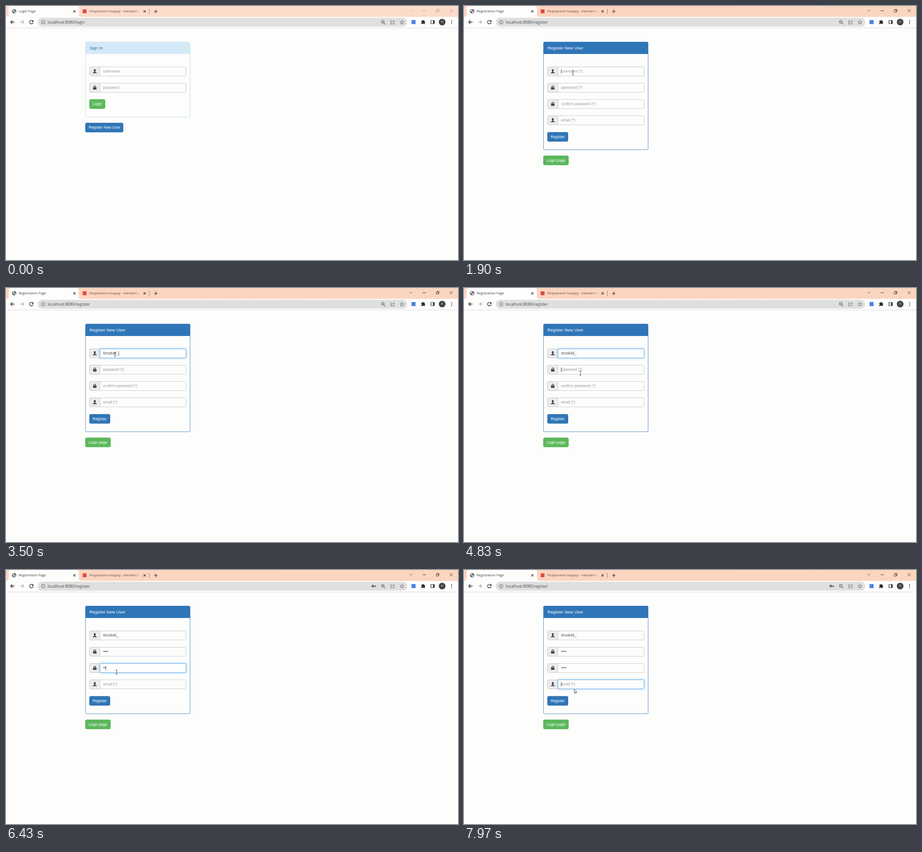
These frames come from a looping animation (998x561 px, 8000 ms). An HTML page with a canvas:

```html
<!DOCTYPE html>
<html lang="en">
<head>
<meta charset="utf-8">
<title>Registration form</title>
<style>
html, body { margin: 0; width: 100%; height: 100%; overflow: hidden; background: #fdfdfc; }
canvas { display: block; width: 998px; height: 561px; }
</style>
</head>
<body>
<canvas id="stage"></canvas>
<script>
const W = 998, H = 561, LOOP = 8000;
const canvas = document.getElementById('stage');
const dpr = window.devicePixelRatio || 1;
canvas.width = W * dpr;
canvas.height = H * dpr;
const c = canvas.getContext('2d');

const UI = '"Open Sans", "Noto Sans", sans-serif';
const ARIAL = '"Liberation Sans", Arial, sans-serif';
const PAPER = '#fdfdfc', INK = '#2b2b2b', GREY = '#5f6368';
const BLUE = '#2f76b8', GREEN = '#5cb85c';
const ROWS = [134, 170, 206, 242];

// Clicks and key presses, in ms
const REGISTER_CLICK = 800, LOADING = 880, LOADED = 1400;
const USER = 'timo846_';
const FIELDS = [
  { hint: 'username (*)', icon: user, click: 1870, value: USER,
    keys: [2300, 2440, 2570, 2710, 2880, 3000, 3120, 3320] },
  { hint: 'password (*)', icon: lock, click: 4810, value: '••••', keys: [5050, 5170, 5290, 5410] },
  { hint: 'confirm password (*)', icon: lock, click: 5900, value: '••••', keys: [6170, 6330, 6480, 6600] },
  { hint: 'email (*)', icon: user, click: 7700, value: '', keys: [] }
];

// Pointer path: time, x, y
const PATH = [
  [60, 262, 308], [560, 230, 270], [850, 230, 269], [1190, 239.5, 227],
  [1300, 240, 222], [1750, 240.5, 147], [3800, 240.5, 147], [4700, 257, 188],
  [5500, 257, 188], [5850, 244, 225.5], [6900, 244, 225.5], [7500, 246, 254],
  [7750, 245, 256], [7900, 243.5, 263.4], [8000, 243.5, 263.4]
];

const clamp = v => Math.max(0, Math.min(1, v));
const ease = v => v * v * (3 - 2 * v);

function text(s, x, y, size, color, family = ARIAL) {
  c.font = size + 'px ' + family;
  c.fillStyle = color;
  c.fillText(s, x, y);
}

function box(x, y, w, h, r, fill, stroke) {
  c.beginPath();
  c.roundRect(x, y, w, h, r);
  if (fill) { c.fillStyle = fill; c.fill(); }
  if (stroke) { c.strokeStyle = stroke; c.lineWidth = 1; c.stroke(); }
}

function disc(x, y, r, fill) {
  c.beginPath();
  c.arc(x, y, r, 0, Math.PI * 2);
  c.fillStyle = fill;
  c.fill();
}

function ring(x, y, r, color, width = 1) {
  c.beginPath();
  c.arc(x, y, r, 0, Math.PI * 2);
  c.strokeStyle = color;
  c.lineWidth = width;
  c.stroke();
}

// Strokes an SVG path placed at x, y
function line(d, x, y, color, width = 1) {
  c.save();
  c.translate(x, y);
  c.strokeStyle = color;
  c.lineWidth = width;
  c.stroke(new Path2D(d));
  c.restore();
}

function shape(d, x, y, fill, stroke, width = 0.8) {
  c.save();
  c.translate(x, y);
  c.fillStyle = fill;
  c.fill(new Path2D(d));
  c.restore();
  if (stroke) line(d, x, y, stroke, width);
}

const CROSS = 'M-2.5 -2.5L2.5 2.5M2.5 -2.5L-2.5 2.5';

function globe(x, y) {
  disc(x, y, 4.7, '#55595e');
  shape('M-3.6 -1.5L-1 -3.7L.8 -2.5L-.6 -1L-.4 .8L-2 .7ZM.5 .3L3.6 -.6L2.6 2.6L.6 3.7L-.6 2Z', x, y, '#f0f0f0');
}

function tabs(t, active) {
  const strip = c.createLinearGradient(0, 0, W, 0);
  strip.addColorStop(0, active ? '#fcd4c0' : '#fddccb');
  strip.addColorStop(1, active ? '#fbd6bf' : '#fbdcca');
  c.fillStyle = strip;
  c.fillRect(0, 0, W, 24);
  shape('M0 24Q6 24 6 18V5Q6 0 11 0H156Q161 0 161 5V18Q161 24 167 24Z', 0, 0, PAPER);

  const loading = t >= LOADING && t < LOADED;
  const title = t < LOADING ? 'Login Page' : loading ? 'localhost:8080/register' : 'Registration Page';
  if (!loading) globe(18, 11.6);
  text(title, 28, 14.3, 7.45, '#3c4043', UI);
  line(CROSS, 151, 11.8, INK, 1.1);

  box(169.3, 7.5, 8.4, 8.4, 0, '#dd4b3e');
  const fade = c.createLinearGradient(282, 0, 298, 0);
  fade.addColorStop(0, '#5a4a45');
  fade.addColorStop(1, 'rgba(90,74,69,0)');
  c.save();
  c.beginPath();
  c.rect(183, 0, 115, 24);
  c.clip();
  text('Результати пошуку - melnarets', 184, 14.3, 7.45, fade, UI);
  c.restore();
  line(CROSS, 306, 11.8, INK, 1.1);
  line('M0 -6V6', 316.5, 12, '#9b8a83');
  line('M-3.8 0H3.8M0 -3.8V3.8', 330.7, 12, INK, 1.2);

  const tone = active ? '#333' : '#b5a199';
  line('M-3.5 -1.7L0 1.8L3.5 -1.7', 894, 10, active ? '#5e504a' : tone, 0.9);
  line('M-3.5 0H3.5', 923.5, 10.5, tone);
  line('M-3 -1.5H1.5V3H-3ZM-1.5 -1.5V-3H3V1.5H1.5', 953, 10.5, tone, 0.9);
  line('M-3.2 -3.2L3.2 3.2M3.2 -3.2L-3.2 3.2', 983, 10.3, tone, 0.9);
}

function toolbar(t) {
  c.fillStyle = PAPER;
  c.fillRect(0, 24, W, 24);
  c.fillStyle = '#dcdddf';
  c.fillRect(0, 48, W, 1);
  box(70, 26, 816, 19.5, 9.75, '#dfdfdf');

  line('M4.5 0H-4M0 -4L-4 0L0 4', 14.3, 35.5, INK, 1.3);
  line('M-4.5 0H4M0 -4L4 0L0 4', 35, 35.5, '#a5a7aa', 1.2);
  if (t >= LOADING && t < LOADED) {
    line('M-3.6 -3.6L3.6 3.6M3.6 -3.6L-3.6 3.6', 56, 35.5, INK, 1.4);
  } else {
    line('M3 -2.6A4 4 0 1 0 3.9 1', 56, 35.5, INK, 1.3);
    shape('M4.5 -4.7V-.6H.4Z', 56, 35.5, INK);
  }
  ring(82, 35.7, 4, GREY, 1);
  line('M0 -.4V2.3M0 -2.3V-1.2', 82, 35.7, GREY, 1.1);
  text('localhost:8080/' + (t < LOADING ? 'login' : 'register'), 92, 39, 8.75, '#44474b', UI);

  if (t >= FIELDS[1].keys[0]) {
    ring(809.8, 35.5, 1.8, '#4a4d51', 1.7);
    line('M2 0H7M5.5 0V2.3', 810, 35.5, '#4a4d51', 1.7);
  }
  ring(832, 34.7, 3, GREY, 1.1);
  line('M2.2 2L5.2 5M-1.5 -.8H1.5', 832, 35.5, GREY, 1.1);
  line('M-1.5 -3H-4V4H3.5V1.5M-2 1.5Q-1.5 -1.7 3.5 -1.7M1.8 -4.2L4.4 -1.7L1.8 .8', 853.5, 35.5, GREY, 0.9);
  line('M0 -4.3L1.3 -1.4L4.4 -1.1L2 1L2.8 4L0 2.4L-2.8 4L-2 1L-4.4 -1.1L-1.3 -1.4Z', 874.3, 35.7, GREY, 0.9);
  box(895.3, 31, 9, 9, 0, '#4a83e8');
  shape('M-4 -2.8H-1.6A1.5 1.5 0 0 1 1.4 -2.8H3.4V-.7A1.5 1.5 0 0 1 3.4 2.2V4.5H1.2A1.5 1.5 0 0 0 -1.8 4.5H-4V2.2A1.5 1.5 0 0 0 -4 -.7Z', 921, 35.4, INK);
  line('M-3.7 -3.5H3.7V3.5H-3.7Z', 942, 35.5, INK, 1.2);
  c.fillStyle = INK;
  c.fillRect(943, 32, 3, 7);
  const face = c.createRadialGradient(963, 34, 0, 963, 35.5, 7.3);
  face.addColorStop(0, '#8b827c');
  face.addColorStop(0.55, '#4a4644');
  face.addColorStop(1, '#34383a');
  disc(963, 35.5, 7.3, face);
  for (const y of [32, 35.5, 39]) disc(984, y, 1, INK);
}

function user(x, y) {
  shape('M-2.2 -2.2A2.2 2.4 0 0 1 2.2 -2.2Q2.2 -.4 1 .7V1.5L4 2.8Q4.4 3.2 4.4 4.2H-4.4Q-4.4 3.2 -4 2.8L-1 1.5V.7Q-2.2 -.4 -2.2 -2.2Z', x, y, '#444');
}

function lock(x, y) {
  line('M-2 0V-1.7A2 2 0 0 1 2 -1.7V0', x, y, '#444', 1.3);
  box(x - 3.8, y - 0.7, 7.6, 5, 0.6, '#444');
}

function button(label, x, y, w, fill, edge) {
  box(x + 0.5, y + 0.5, w - 1, 20, 2.5, fill, edge);
  text(label, x + 7.5, y + 13.4, 8.3, '#fff');
}

function panel(title, bottom, head, edge, color) {
  box(175.5, 79.5, 231, bottom - 80, 2.5, PAPER, edge);
  box(175.5, 79.5, 231, 26.5, [2.5, 2.5, 0, 0], head);
  text(title, 184.2, 95.8, 9.45, color);
}

function input(y, icon, content, color, glow) {
  box(184.5, y + 0.5, 23, 20, [2.5, 0, 0, 2.5], '#ececec', '#c8c8c8');
  icon(196, y + 10.2);
  if (glow > 0) {
    c.save();
    c.shadowColor = `rgba(102,175,233,${0.75 * glow})`;
    c.shadowBlur = 5 * dpr;
    box(207, y, 191, 21, [0, 3, 3, 0], '#fff');
    c.restore();
  }
  const mix = (a, b) => Math.round(a + (b - a) * glow);
  box(207.5, y + 0.5, 190, 20, [0, 2.5, 2.5, 0], PAPER,
    `rgb(${mix(204, 102)},${mix(204, 175)},${mix(204, 233)})`);
  text(content, 214.4, y + 13.2, 8.3, color);
}

function loginPage(t, over) {
  panel('Sign In', 246, '#d4e9f8', '#c4e2ea', '#31708f');
  input(ROWS[0], user, 'username', '#999', 0);
  input(ROWS[1], lock, 'password', '#999', 0);
  button('Login', 184, 206, 35, GREEN, '#4cae4c');
  const dark = over || t >= REGISTER_CLICK;
  button('Register New User', 175, 258, 84, dark ? '#245f90' : BLUE, dark ? '#204d74' : '#2e6da4');
}

function registerPage(t) {
  panel('Register New User', 318, BLUE, '#5c93c4', '#fff');
  FIELDS.forEach((f, i) => {
    const next = FIELDS[i + 1];
    const gone = next ? clamp((t - next.click) / 150) : 0;
    const glow = ease(clamp((t - f.click) / 150)) * (1 - ease(gone));
    const typed = f.value.slice(0, f.keys.filter(k => k <= t).length);
    input(ROWS[i], f.icon, typed || f.hint, typed ? '#555' : '#999', glow);

    const focused = t >= f.click && !(next && t >= next.click);
    const last = [f.click, ...f.keys].filter(k => k <= t).pop();
    if (focused && Math.floor((t - last) / 530) % 2 === 0) {
      const x = 214.4 + (typed ? c.measureText(typed).width : 0);
      c.fillStyle = '#333';
      c.fillRect(x, ROWS[i] + 5.5, 0.8, 10);
    }
  });
  button('Register', 184, 278.5, 46, BLUE, '#2e6da4');
  button('Login page', 175, 330.5, 56, GREEN, '#4cae4c');
}

function pointerAt(t) {
  if (t < PATH[0][0]) return null;
  const i = Math.max(1, PATH.findIndex(p => p[0] > t));
  const [t0, x0, y0] = PATH[i - 1], [t1, x1, y1] = PATH[i];
  const k = ease(clamp((t - t0) / (t1 - t0)));
  return { x: x0 + (x1 - x0) * k, y: y0 + (y1 - y0) * k };
}

function pointer(p, over, rows) {
  const { x, y } = p;
  if (over) {
    shape('M-1 0Q0 -1 1 0V4L4.6 5Q5.4 5.4 5.2 6.5L4.3 10.5H-1.2L-4 6.6Q-3.7 5.4 -2.5 6L-1 7.2Z', x, y, '#fff', '#333');
  } else if (rows.some(r => y >= r && y <= r + 21)) {
    line('M-2 -4.5H-.6L0 -4L.6 -4.5H2M0 -4V4M-2 4.5H-.6L0 4L.6 4.5H2', x, y, '#333', 0.9);
  } else {
    shape('M0 0V8.2L1.9 6.5L3.2 9.5L4.6 8.9L3.3 6H5.6Z', x, y, '#fff', '#333');
  }
}

function draw(t) {
  c.setTransform(dpr, 0, 0, dpr, 0, 0);
  c.fillStyle = PAPER;
  c.fillRect(0, 0, W, H);
  tabs(t, t >= REGISTER_CLICK);
  toolbar(t);
  const p = pointerAt(t);
  const onLogin = t < LOADED;
  const over = onLogin && p && p.x < 259 && p.y >= 258 && p.y <= 279;
  if (onLogin) loginPage(t, over); else registerPage(t);
  if (p) pointer(p, over, onLogin ? ROWS.slice(0, 2) : ROWS);
}

function tick() {
  draw(performance.now() % LOOP);
  requestAnimationFrame(tick);
}
tick();
</script>
</body>
</html>
```
